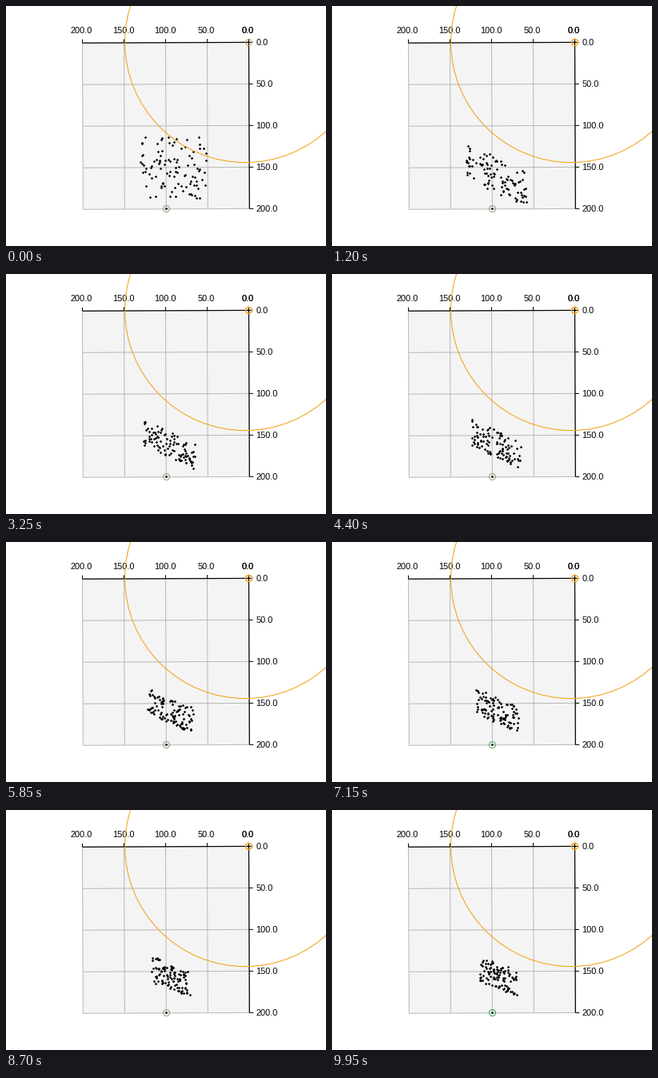
A matplotlib script that plays this animation: 400x300 px, repeating every 10 s.

```python
import numpy as np
import matplotlib.pyplot as plt
from matplotlib.animation import FuncAnimation
from matplotlib.collections import PolyCollection
from matplotlib.patches import Circle, Polygon

plt.rcParams["font.family"] = "Liberation Sans"
W, H, DPI = 400, 300, 100
PX = 72 / DPI
FRAMES, STEP = 200, 50
START = 8            # last frame before the swarm starts to move
COUNT = 100
ORANGE, GRID = "#f5a623", "#b8b8b8"
ORIGIN = np.array([303.5, 45.4])
SIDE, TILT = 208, 0.004
DIAMOND = 1.7 * np.array([[1, 0], [0, 1], [-1, 0], [0, -1]])

fig = plt.figure(figsize=(W / DPI, H / DPI), dpi=DPI, facecolor="white")
ax = fig.add_axes([0, 0, 1, 1])
ax.set_xlim(0, W)
ax.set_ylim(H, 0)
ax.axis("off")


def plot_point(left, down):
    """Stage position of a point in the slightly rotated plot."""
    return ORIGIN + [TILT * down - left, down + TILT * left]


def line(a, b, color="black", width=1.0, z=2):
    x, y = zip(plot_point(*a), plot_point(*b))
    ax.plot(x, y, color=color, lw=width * PX, solid_capstyle="butt", zorder=z)


def label(x, y, value, ha):
    ax.text(x, y, f"{value:.1f}", size=11 * PX, ha=ha, va="baseline", zorder=5)


def diamonds(centres):
    return np.asarray(centres)[:, None] + DIAMOND


def dot_layer(centres, z):
    layer = PolyCollection(diamonds(centres), fc="black", ec="none", lw=0, zorder=z)
    return ax.add_collection(layer, autolim=False)


def target(centre, color):
    dot_layer([centre], 8)
    return ax.add_patch(Circle(centre, 4, fill=False, ec=color, lw=PX, zorder=7))


# Plot area with grid and axes along the top and right edges
corners = [(0, 0), (SIDE, 0), (SIDE, SIDE), (0, SIDE)]
ax.add_patch(Polygon([plot_point(*c) for c in corners],
                     fc="#f4f4f4", ec="none", zorder=1))
for i in range(5):
    value, d = 50 * i, SIDE * i / 4
    line((d, 0), (d, SIDE), GRID)
    line((0, d), (SIDE, d), GRID)
    line((d, -4.5), (d, 0), z=4)
    line((-5, d), (0, d), z=4)
    label(ORIGIN[0] - d - 1, 34.3, value, "center")
    label(312.5, ORIGIN[1] + d + 3.4, value, "left")
label(ORIGIN[0] - 1, 34.3, 0, "center")
line((SIDE, 0), (0, 0), width=1.2, z=4)
line((0, 0), (0, SIDE), width=1.2, z=4)

ax.add_patch(Circle((299, 45.2), 150.4, fill=False, ec=ORANGE,
                    lw=1.1 * PX, zorder=6))
home = target(ORIGIN, ORANGE)
beacon = target((200.5, 253.5), "gray")


def drift():
    """Particle offsets per frame: a random walk reflected inside a square."""
    rng = np.random.default_rng(12)
    lim = np.sqrt(3)
    walk = rng.normal(0, 0.1, (FRAMES, COUNT, 2))
    walk[:START + 1] = 0
    z = rng.uniform(-lim, lim, (COUNT, 2)) + walk.cumsum(axis=0)
    return lim - np.abs((z + lim) % (4 * lim) - 2 * lim)


def cloud(n):
    """Quickly lean into a diagonal band, then slowly tighten."""
    p = max(0, n - START) / (FRAMES - 1 - START)
    lean = 1 - np.exp(-p / 0.06)
    skew = lean * (0.8 - 0.33 * p)
    u, v = OFFSETS[n].T
    x = 210 - 6 * lean + 4 * p + 24.3 * (1 - 0.45 * p ** 0.6) * u
    y = (201 + 15 * lean - 8 * p
         + (23.5 - 9.5 * lean - 3.5 * p) * (skew * u + np.sqrt(1 - skew ** 2) * v))
    return np.floor(np.column_stack([x, y])) + 0.5


def ring_color(t):
    """Olive grey with a green pulse that grows late in the loop."""
    pulse = 0.5 + 0.5 * np.cos(2 * np.pi * (t - 7.15) / 2.8)
    green = np.clip((t - 4.5) / 5, 0, 1) * pulse
    olive, leaf = np.array([0.61, 0.59, 0.48]), np.array([0.16, 0.65, 0.27])
    return olive + green * (leaf - olive)


OFFSETS = drift()
swarm = dot_layer(cloud(0), 5)


def update(n):
    swarm.set_verts(diamonds(cloud(n)))
    beacon.set_edgecolor(ring_color(n * STEP / 1000))
    lit = n >= 2
    home.set_edgecolor(ORANGE if lit else "#c9985a")
    home.set_linewidth((1.5 if lit else 0.9) * PX)
    return swarm, beacon, home


anim = FuncAnimation(fig, update, frames=FRAMES, interval=STEP,
                     repeat=True, repeat_delay=0, blit=False)
plt.show()
```
